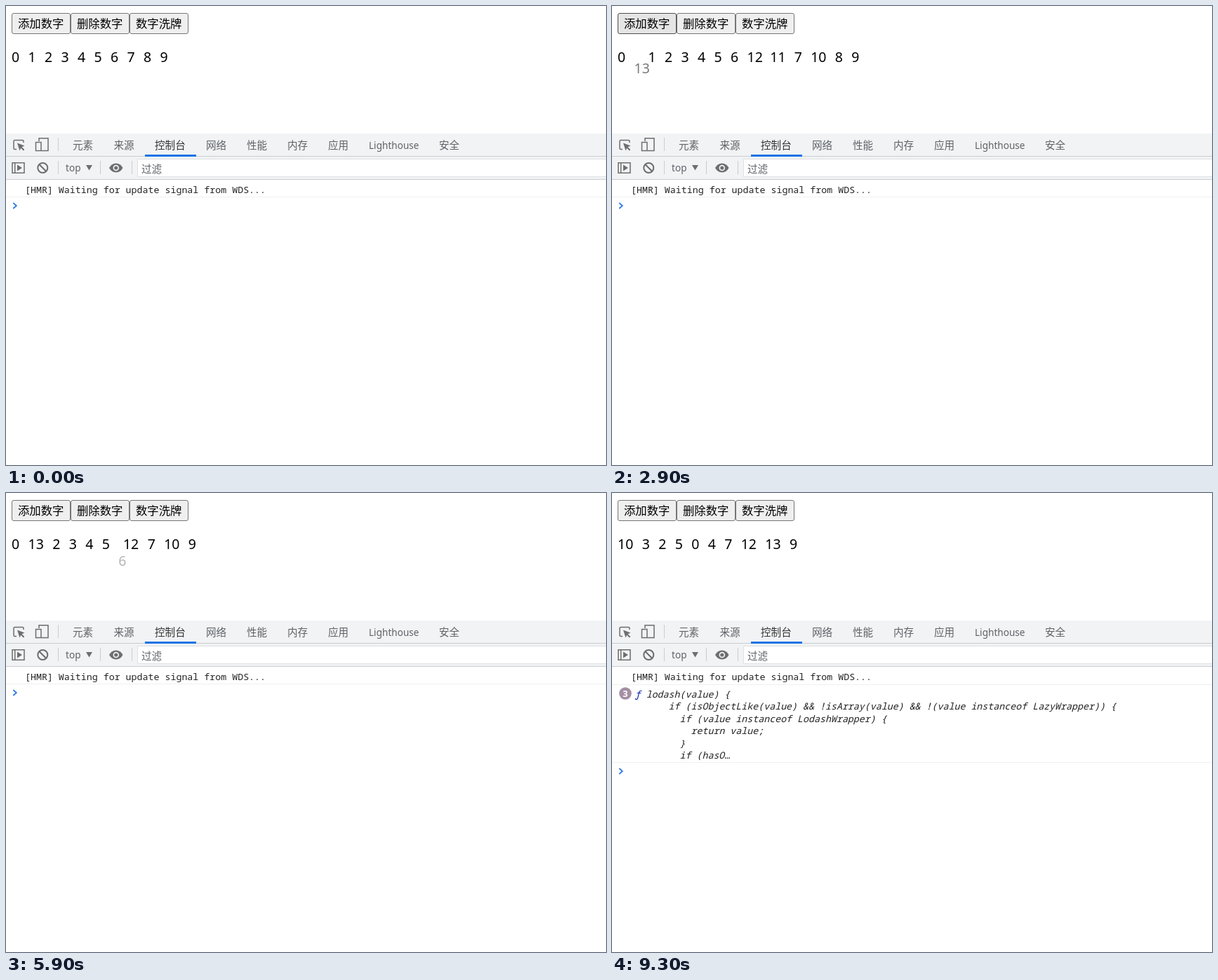
An HTML page for the animation above (9.8 s loop, 855 px wide and 655 px high).

```html
<!DOCTYPE html>
<html lang="zh-CN">
<head>
<meta charset="utf-8">
<title>数字洗牌</title>
<style>
html, body { margin: 0; width: 100%; height: 100%; overflow: hidden; background: #fff; }
svg { display: block; width: 855px; height: 655px; }
text { font-family: "Noto Sans", "Noto Sans CJK SC", "Noto Sans CJK", sans-serif; }
.btn text { font-size: 16.4px; text-anchor: middle; }
.btn rect { fill: #efefef; stroke: #767676; }
.btn.hover rect { fill: #e5e5e5; stroke: #4f4f4f; }
.btn.press rect { fill: #f5f5f5; stroke: #8d8d8d; }
.num { font-size: 19.5px; text-anchor: middle; }
.tab { font-size: 14.6px; fill: #5f6368; }
.latin { font-size: 13.6px; fill: #5f6368; }
.mono { font-family: "Noto Sans Mono", "DejaVu Sans Mono", monospace; font-size: 13.3px; fill: #222; }
.code .mono { font-style: italic; }
.icon { fill: none; stroke: #6e6e6e; stroke-width: 1.5; }
.solid { fill: #6e6e6e; }
.rule { stroke: #cacdd1; }
.row { stroke: #f0f0f0; }
</style>
</head>
<body>
<svg viewBox="0 0 855 655">
  <g id="buttons"></g>
  <g id="numbers"></g>

  <rect y="182" width="855" height="66" fill="#f1f3f4"/>
  <path class="rule" d="M0 214.5H855M0 247.5H855M74.5 188V207M74.5 221V240M134.5 221V240M179.5 221V240"/>
  <rect x="187.5" y="218.5" width="680" height="25" fill="#fff" stroke="#dfe1e3"/>
  <rect x="198" y="212" width="73" height="3" fill="#1a73e8"/>
  <g id="tabs"></g>

  <path class="icon" d="M15 204.500H12.500Q11 204.500 11 203V193Q11 191.500 12.500 191.500H23.500Q25 191.500 25 193V195"/>
  <path class="solid" d="M16 195.500L26.500 199.500 22.600 201.300 26.300 205 24.800 206.500 21.200 202.800 19.500 206.500Z"/>
  <path class="icon" d="M47 193V188.800H60V206.500H50.500"/>
  <rect class="icon" x="42.500" y="194.500" width="7.500" height="12"/>
  <path class="icon" d="M9 223.700H26V238.300H9ZM12.700 223.700V238.300"/>
  <path class="solid" d="M16 226.500L23 231 16 235.500Z"/>
  <g class="icon" style="stroke-width:2"><circle cx="52.300" cy="231" r="7"/><path d="M47.300 226L57.300 236"/></g>
  <text class="latin" x="85" y="236">top</text>
  <path class="solid" d="M114 227H123L118.500 234.500Z"/>
  <path class="solid" d="M147 231Q150.500 224.500 156.800 224.500T166.500 231Q163 237.500 156.800 237.500T147 231Z"/>
  <circle cx="156.800" cy="231" r="4.300" fill="#f1f3f4"/>
  <circle class="solid" cx="156.800" cy="231" r="2.600"/>
  <text class="tab" x="193" y="237.500">过滤</text>

  <text class="mono" x="27" y="266.500">[HMR] Waiting for update signal from WDS...</text>
  <path id="row" class="row"/>
  <g id="log">
    <g id="code" class="code"></g>
    <g id="badge">
      <circle cx="19" cy="286" r="8.800" fill="#a48fa3"/>
      <text id="count" x="19" y="290.700" font-size="13" font-weight="700" fill="#fff" text-anchor="middle"></text>
    </g>
  </g>
  <path id="prompt" d="M10.300 -4L14.800 0 10.300 4" fill="none" stroke="#2f7be8" stroke-width="1.800"/>
</svg>
<script>
const LOOP = 9800, STEP = 100, MOVE = 1000, ENTER_LAG = 30, DROP = 35;
const DIGIT = 11.15, GAP = 12.35, LEFT = 8, BASE = 79.5;
const $ = id => document.getElementById(id);

function make(parent, tag, attrs, text) {
  const el = document.createElementNS('http://www.w3.org/2000/svg', tag);
  for (const k in attrs) el.setAttribute(k, attrs[k]);
  if (text !== undefined) el.textContent = text;
  return parent.appendChild(el);
}

// Static labels
const buttons = ['添加数字', '删除数字', '数字洗牌'].map((label, i) => {
  const g = make($('buttons'), 'g', { class: 'btn' }), x = 8.5 + i * 84;
  make(g, 'rect', { x, y: 10.5, width: 83, height: 29, rx: 2.5 });
  make(g, 'text', { x: x + 41.2, y: 31.2 }, label);
  return g;
});

[['元素', 95], ['来源', 153.5], ['控制台', 212], ['网络', 285], ['性能', 343], ['内存', 401],
 ['应用', 459], ['Lighthouse', 517], ['安全', 617]].forEach(([label, x]) => {
  const el = make($('tabs'), 'text', { class: label === 'Lighthouse' ? 'latin' : 'tab', x, y: 203.5 }, label);
  if (label === '控制台') el.style.fill = '#333';
});

make($('code'), 'text', { class: 'mono', x: 27, y: 291.5, style: 'fill:#0d22aa' }, 'ƒ');
[[2, 'lodash(value) {'],
 [6, 'if (isObjectLike(value) && !isArray(value) && !(value instanceof LazyWrapper)) {'],
 [8, 'if (value instanceof LodashWrapper) {'],
 [10, 'return value;'],
 [8, '}'],
 [8, 'if (hasO…']].forEach(([indent, line], i) =>
  make($('code'), 'text', { class: 'mono', x: 27 + indent * 7.98, y: 291.5 + i * 17.5 }, line));

const labels = Array.from({ length: 14 }, (_, n) => make($('numbers'), 'text', { class: 'num' }, n));

// Clicks: [time, action, number or order, number to insert before]
const clicks = [
  [690, 'add', 10, 8],
  [1380, 'add', 11, 7],
  [1990, 'add', 12, 11],
  [2565, 'add', 13, 1],
  [3480, 'remove', 8],
  [4190, 'remove', 11],
  [4560, 'remove', 1],
  [5480, 'remove', 6],
  [6290, 'shuffle', [7, 13, 4, 3, 12, 10, 2, 5, 9, 0]],
  [7490, 'shuffle', [3, 9, 12, 0, 10, 5, 13, 7, 2, 4]],
  [8290, 'shuffle', [10, 3, 2, 5, 0, 4, 7, 12, 13, 9]]
];
const hovers = [[0, -1], [300, 1], [400, 0], [3200, 1], [5800, -1], [6100, 2], [8800, -1]];
const presses = [1900, 2500, 3400, 4500, 5400, 8200];

// The CSS "ease" curve
function ease(p) {
  if (p <= 0) return 0;
  if (p >= 1) return 1;
  const bez = (a, b, s) => 3 * (1 - s) * (1 - s) * s * a + 3 * (1 - s) * s * s * b + s * s * s;
  let lo = 0, hi = 1;
  for (let i = 0; i < 24; i++) {
    const mid = (lo + hi) / 2;
    if (bez(.25, .25, mid) < p) lo = mid; else hi = mid;
  }
  return bez(.1, 1, lo);
}

const width = n => DIGIT * String(n).length;
const xAt = (item, t) => item.from + (item.to - item.from) * ease((t - item.start) / MOVE);

// Leaving items take no room and jump with the layout; the others glide.
function layout(list, t) {
  let x = LEFT;
  for (const item of list) {
    const to = x + width(item.n) / 2, jump = item.gone !== undefined || item.to === undefined;
    item.from = jump ? to : xAt(item, t);
    item.to = to;
    item.start = t;
    if (item.gone === undefined) x += width(item.n) + GAP;
  }
}

function itemsAt(now) {
  let list = Array.from({ length: 10 }, (_, n) => ({ n }));
  layout(list, -MOVE);
  for (const [t, action, arg, before] of clicks) {
    if (t > now) break;
    const find = n => list.find(item => item.n === n);
    if (action === 'add') list.splice(list.indexOf(find(before)), 0, { n: arg, born: t + ENTER_LAG });
    else if (action === 'remove') find(arg).gone = t;
    else list = arg.map(find);
    layout(list, t);
  }
  return list;
}

function drawNumbers(now) {
  labels.forEach(el => el.setAttribute('opacity', 0));
  for (const item of itemsAt(now)) {
    let shown = 1;
    if (item.born !== undefined) shown = ease((now - item.born) / MOVE);
    if (item.gone !== undefined) shown = 1 - ease((now - item.gone) / MOVE);
    const el = labels[item.n];
    el.setAttribute('x', xAt(item, now));
    el.setAttribute('y', BASE + DROP * (1 - shown));
    el.setAttribute('opacity', shown);
  }
}

function drawButtons(now) {
  const hover = hovers.filter(h => h[0] <= now).pop()[1];
  const state = presses.includes(now) ? 'press' : 'hover';
  buttons.forEach((b, i) => b.setAttribute('class', i === hover ? 'btn ' + state : 'btn'));
}

function drawConsole(now) {
  const pending = now >= 6300, logged = now >= 6400, repeated = now >= 7500;
  const end = logged ? 384.5 : 296.5;
  $('row').setAttribute('d', pending ? `M0 273.5H855M0 ${end}H855` : 'M0 272.5H855');
  $('prompt').setAttribute('transform', `translate(0 ${logged ? 397 : pending ? 309 : 285})`);
  $('log').setAttribute('visibility', logged ? 'visible' : 'hidden');
  $('badge').setAttribute('display', repeated ? 'inline' : 'none');
  $('code').setAttribute('transform', `translate(${repeated ? 5.7 : 0} 0)`);
  $('count').textContent = now >= 8300 ? 3 : 2;
}

const begin = performance.now();
let last = -1;
function frame() {
  const t = (performance.now() - begin) % LOOP;
  const now = Math.floor(t / STEP) * STEP;
  if (now !== last) {
    drawButtons(now);
    drawNumbers(now);
    drawConsole(now);
    last = now;
  }
  requestAnimationFrame(frame);
}
frame();
</script>
</body>
</html>
```
